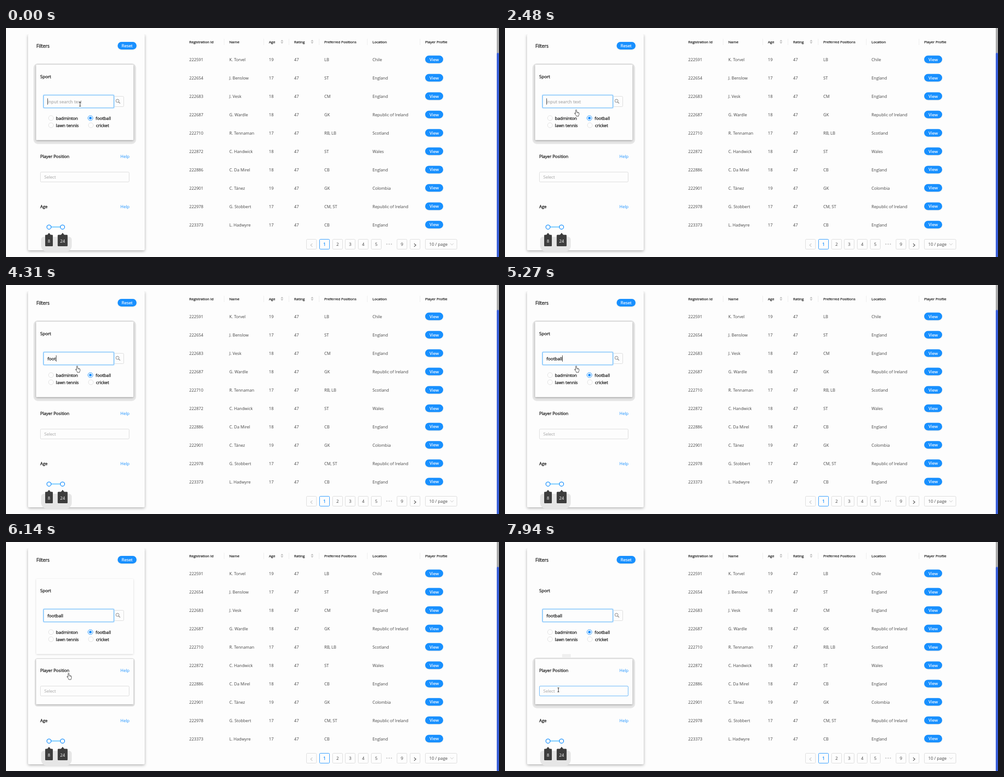
These frames come from a looping animation (1095 px wide and 511 px high, 8 s). An HTML page with a canvas:

```html
<!DOCTYPE html>
<html lang="en">
<head>
<meta charset="utf-8">
<title>Player filters</title>
<style>
html, body { margin: 0; width: 100%; height: 100%; overflow: hidden; background: #fdfdfd; }
canvas { display: block; }
</style>
</head>
<body>
<canvas id="stage" width="1095" height="511"></canvas>
<script>
const ctx = document.getElementById('stage').getContext('2d');
const LOOP = 8000, TICK = 128, BLINK = 510;
const BLUE = '#1890ff', LINE = '#d9d9d9', PAPER = '#fdfdfd', INK = '#1c1c1c', SOFT = '#424242', HINT = '#b4b4b4';
const WORD = 'football', TYPE_START = 3450, KEY_GAP = 260, LEAVE = 5750;

const players = [
  [222591, 'K. Torvel', 19, 'LB', 'Chile'],
  [222654, 'J. Benslow', 17, 'ST', 'England'],
  [222683, 'J. Vesk', 18, 'CM', 'England'],
  [222687, 'G. Wardle', 18, 'GK', 'Republic of Ireland'],
  [222710, 'R. Tennaman', 17, 'RB, LB', 'Scotland'],
  [222872, 'C. Handwick', 18, 'ST', 'Wales'],
  [222886, 'C. Da Mirel', 18, 'CB', 'England'],
  [222901, 'C. Tánez', 19, 'GK', 'Colombia'],
  [222978, 'G. Stobbert', 17, 'CM, ST', 'Republic of Ireland'],
  [223373, 'L. Hadwyre', 17, 'CB', 'England']
];

// Pointer path: time, x, y
const path = [[1910, 164.5, 170], [2166, 159.5, 190], [2806, 159.5, 187], [5622, 159.5, 187], [LEAVE, 158, 201],
  [6006, 140.5, 298], [6774, 140.5, 304], [6902, 132, 351], [7030, 125, 359], [7542, 118.5, 336], [7926, 118.5, 330]];

const clamp = v => Math.max(0, Math.min(1, v));
const ramp = (t, from, span) => clamp((t - from) / span);
const stepped = t => LEAVE + Math.floor((t - LEAVE) / TICK + 1e-6) * TICK;

function pointerAt(t) {
  const i = path.findIndex(p => p[0] > t);
  if (i === 0) return path[0].slice(1);
  if (i < 0) return path[path.length - 1].slice(1);
  const [a, b] = [path[i - 1], path[i]], k = ramp(t, a[0], b[0] - a[0]);
  return [a[1] + (b[1] - a[1]) * k, a[2] + (b[2] - a[2]) * k];
}

function typingAt(t) {
  if (t >= TYPE_START) {
    const n = Math.min(WORD.length, 1 + Math.floor((t - TYPE_START) / KEY_GAP));
    return { typed: WORD.slice(0, n), edit: TYPE_START + (n - 1) * KEY_GAP };
  }
  if (t >= 1410) return { typed: '', edit: 1410 };
  if (t >= 290) return { typed: t < 1290 ? 'f' : '', edit: 290 };
  return { typed: '', edit: 0 };
}

// weight adds a thin outline, for medium type
function text(str, x, y, size, color, align = 'left', weight = 0) {
  ctx.font = `${size}px "Open Sans", "Noto Sans", sans-serif`;
  ctx.fillStyle = ctx.strokeStyle = color;
  ctx.textAlign = align;
  ctx.fillText(str, x, y);
  if (!weight) return;
  ctx.lineWidth = weight;
  ctx.strokeText(str, x, y);
}
const label = (str, x, y, size = 9.4, color = INK) => text(str, x, y, size, color, 'left', 0.35);

function box(x, y, w, h, r, fill, stroke, width = 1) {
  ctx.beginPath();
  ctx.roundRect(x, y, w, h, r);
  if (fill) { ctx.fillStyle = fill; ctx.fill(); }
  if (stroke) { ctx.strokeStyle = stroke; ctx.lineWidth = width; ctx.stroke(); }
}

function line(color, width, ...pts) {
  ctx.beginPath();
  for (let i = 0; i < pts.length; i += 2) ctx.lineTo(pts[i], pts[i + 1]);
  ctx.strokeStyle = color;
  ctx.lineWidth = width;
  ctx.stroke();
}

const circle = (x, y, r, fill, stroke, width) => box(x - r, y - r, 2 * r, 2 * r, r, fill, stroke, width);

function shadow(alpha, blur, dy, draw) {
  ctx.save();
  ctx.shadowColor = `rgba(0,0,0,${alpha})`;
  ctx.shadowBlur = blur;
  ctx.shadowOffsetY = dy;
  draw();
  ctx.restore();
}

function pill(str, x, y, w) {
  shadow(0.1, 2, 1, () => box(x, y - 8.5, w, 17, 8.5, BLUE));
  text(str, x + w / 2, y + 3.6, 9.5, '#fff', 'center', 0.2);
}

function triangle(x, y, dir) {
  ctx.beginPath();
  ctx.moveTo(x - 3, y + 1.7 * dir);
  ctx.lineTo(x + 3, y + 1.7 * dir);
  ctx.lineTo(x, y - 1.7 * dir);
  ctx.fillStyle = '#bfbfbf';
  ctx.fill();
}

function card(y, h, lift) {
  if (!lift) return;
  const side = 6 * lift, top = 3 * lift;
  box(67 - side, y - top, 216 + 2 * side, h + 4 * top, 2 + 8 * lift, '#e6e6e6');
  shadow(0.1 + 0.2 * lift, 4, 1.5, () => box(67, y, 216, h, 1, PAPER));
}

function radio(str, x, y, labelX, on) {
  circle(x, y, 5.5, PAPER, on ? BLUE : '#e0e0e0');
  if (on) circle(x, y, 3, BLUE);
  label(str, labelX, y + 3.6, 9.5);
}

function tooltip(str, x, w) {
  ctx.beginPath();
  ctx.moveTo(x, 457);
  ctx.lineTo(x + 4, 462);
  ctx.lineTo(x - 4, 462);
  ctx.fillStyle = '#3d3d3d';
  ctx.fill();
  box(x - w / 2, 461.5, w, 25.5, 1.5, '#3d3d3d');
  text(str, x, 478.5, 9.5, '#fff', 'center');
}

function searchField(t) {
  box(240.5, 152.5, 21, 23, 2, PAPER, LINE);
  circle(247.6, 162.5, 3.5, null, '#777');
  line('#777', 1.2, 250.2, 165, 253.5, 168.3);
  box(83, 149.5, 157, 29, 2, null, '#d1e9ff', 3);
  box(83.5, 150, 156, 28, 1.5, PAPER, '#62b5f8', 1.2);
  const { typed, edit } = typingAt(t);
  label(typed || 'input search text', 92, 168.3, 9.8, typed ? INK : HINT);
  if ((t - edit) % (2 * BLINK) < BLINK) {
    ctx.fillStyle = '#333';
    ctx.fillRect(Math.round(92 + (typed && ctx.measureText(typed).width)), 157, 1, 14);
  }
}

function filters(t, now) {
  shadow(0.32, 6, 2, () => box(49, 14, 259, 482, 2, PAPER));
  ctx.fillStyle = PAPER;
  ctx.fillRect(44, 8, 270, 6);
  label('Filters', 67.5, 43.5, 10.4);
  pill('Reset', 248, 39.4, 42);

  const sport = 1 - ramp(now, 5860, 290);
  card(82, 168, sport);
  if (!sport) {
    ctx.fillStyle = '#f0f0f0';
    ctx.fillRect(127, 250, 19, 7.5);
  }
  card(261, 101, ramp(now, 5976, 280));

  label('Sport', 76, 112, 9.6);
  searchField(t);
  radio('badminton', 100, 201, 111);
  radio('football', 187.5, 201, 199, true);
  radio('lawn tennis', 100, 217, 111);
  radio('cricket', 188.5, 217, 200);

  label('Player Position', 76, 290.3);
  text('Help', 254, 290.3, 9.4, BLUE);
  box(76.5, 321.5, 197, 22, 2, PAPER, LINE);
  box(76.5, 321.5, 197, 22, 2, null, `rgba(64,169,255,${0.85 * ramp(now, 7380, 300)})`);
  text('Select', 85, 336, 9.4, HINT, 'left', 0.2);

  label('Age', 76, 402.3);
  text('Help', 254, 402.3, 9.4, BLUE);
  box(78, 466, 68, 33, [6, 6, 13, 13], '#e6e6e6');
  line('#91d5ff', 3, 100, 444, 121, 444);
  for (const x of [95.5, 125.5]) circle(x, 444.2, 4.7, PAPER, BLUE, 1.5);
  tooltip('8', 95.5, 17);
  tooltip('24', 125.8, 22);
}

function table() {
  const cols = [407, 496, 584, 640, 707, 814, 931];
  const heads = ['Registration Id', 'Name', 'Age', 'Rating', 'Preferred Positions', 'Location', 'Player Profile'];
  heads.forEach((head, i) => {
    text(head, cols[i], 33.7, 8, INK, 'left', 0.25);
    if (i) line('#ececec', 1, cols[i] - 11.5, 24, cols[i] - 11.5, 38);
  });
  for (const x of [613, 680]) {
    triangle(x, 28, 1);
    triangle(x, 33.3, -1);
  }
  players.forEach(([id, name, age, position, place], i) => {
    const y = 70 + 40.98 * i;
    [id, name, age, 47, position, place].forEach((v, c) => text(v, cols[c], Math.round(y + 3.8), 9.15, SOFT));
    pill('View', 931, y, 40);
  });
}

function pages() {
  const cell = (x, str, on) => {
    box(x - 11, 471.5, 22, 22, 2, PAPER, on ? BLUE : LINE);
    text(str, x, 486.2, 9.5, on ? BLUE : SOFT, 'center', on ? 0.35 : 0);
  };
  const chevron = (x, dir, color) => line(color, 1.1, x - 2 * dir, 481, x + 2 * dir, 484.5, x - 2 * dir, 488);
  ['', 1, 2, 3, 4, 5, null, 9, ''].forEach((str, i) => {
    if (str !== null) cell(678.5 + Math.round(28.75 * i), str, str === 1);
  });
  chevron(678.5, -1, '#c4c4c4');
  chevron(908.5, 1, '#444');
  for (const x of [846, 851, 856]) circle(x, 482.3, 1.3, '#c4c4c4');
  box(931.5, 471.5, 70, 22, 2, PAPER, LINE);
  text('10 / page', 940, 486.2, 9.5, SOFT);
  line('#c4c4c4', 1, 987, 480.5, 990.5, 484.5, 994, 480.5);
}

const hand = new Path2D('M-2.6 2.5V-5.2a1.1 1.1 0 0 1 2.2 0V-1.2l4 .8q1.4 .4 1.4 1.8v2q0 1.6-1 3v1.6h-5.2v-1.4l-3.6-4.4q-.6-1.6 .8-1.5z');

function cursor(now) {
  const [x, y] = pointerAt(now);
  const overText = y < 179 || (y > 321 && y < 344);
  ctx.save();
  ctx.translate(x, y);
  if (overText) {
    line('#222', 1, 0, -4, 0, 4);
    for (const dy of [-4.5, 4.5]) line('#222', 1, -2, dy, 2, dy);
  } else {
    ctx.fillStyle = '#fff';
    ctx.fill(hand);
    ctx.strokeStyle = '#444';
    ctx.lineWidth = 1;
    ctx.stroke(hand);
    for (const dx of [1.2, 3]) line('#444', 0.7, dx, -0.8, dx, 1.6);
  }
  ctx.restore();
}

function scrollbar() {
  ctx.fillStyle = '#a9a9a9';
  ctx.fillRect(1090, 0, 5, 56);
  box(1090, 55.5, 5, 460, 2, '#3a5fd9');
}

let start;
function frame(time) {
  start ??= time;
  const t = (time - start) % LOOP, now = stepped(t);
  ctx.fillStyle = PAPER;
  ctx.fillRect(0, 0, 1095, 511);
  filters(t, now);
  table();
  pages();
  scrollbar();
  cursor(now);
  requestAnimationFrame(frame);
}
requestAnimationFrame(frame);
</script>
</body>
</html>
```
